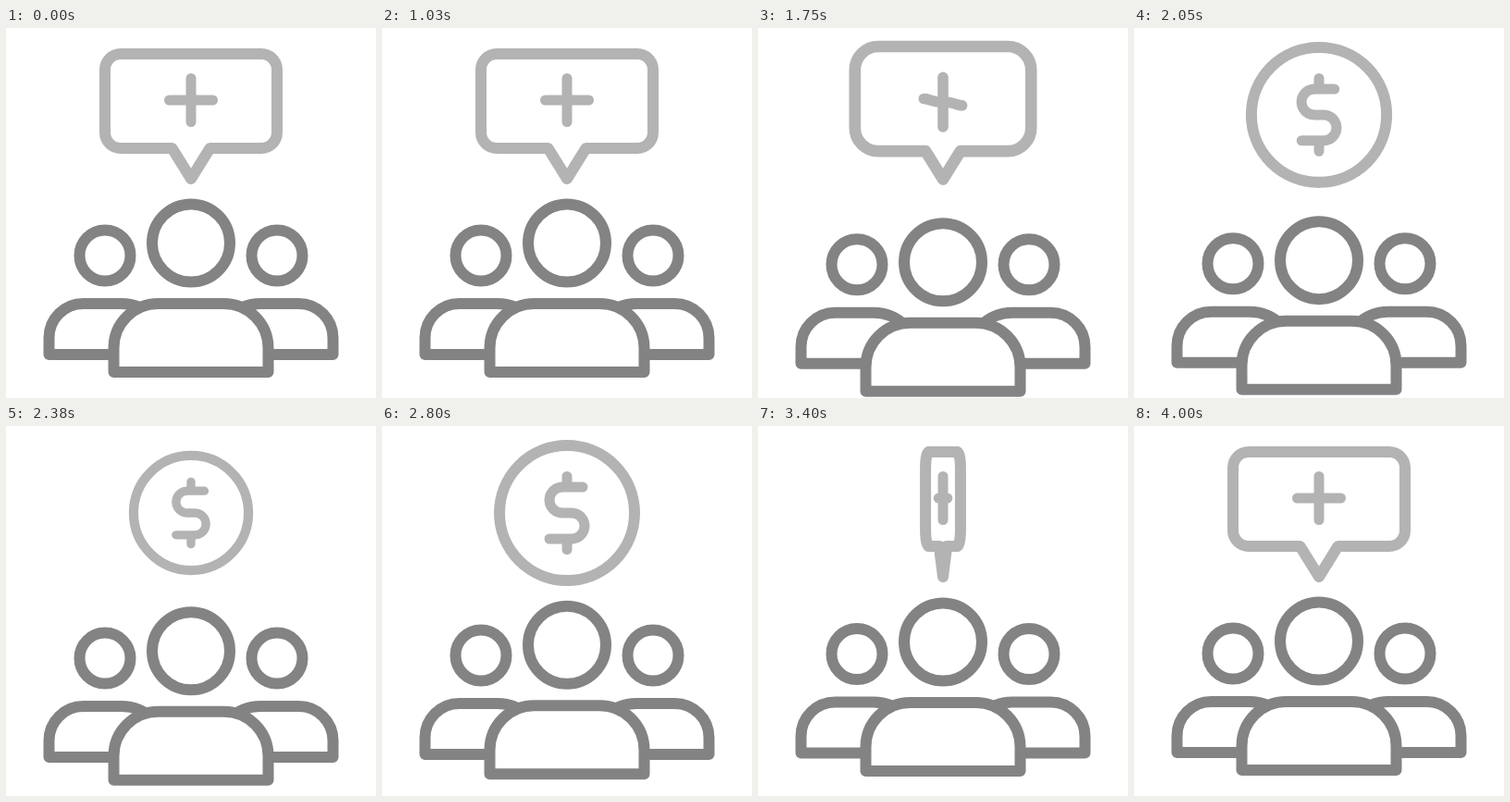
An HTML page with a canvas for the animation above (4030 ms loop, 400 by 400 pixels).

```html
<!DOCTYPE html>
<html>
<head>
<meta charset="utf-8">
<style>
html, body { margin: 0; width: 100%; height: 100%; overflow: hidden; background: #fff; }
canvas { display: block; }
</style>
</head>
<body>
<canvas id="stage" width="400" height="400"></canvas>
<script>
const ctx = document.getElementById('stage').getContext('2d');
const LOOP = 4030, DARK = '#838383', LIGHT = '#b3b3b3';
const mix = (a, b, k) => a + (b - a) * k;

// Smooth track through [time, value] points that never overshoots them.
function track(keys) {
  const last = keys.length - 1;
  const slope = i => (keys[i + 1][1] - keys[i][1]) / (keys[i + 1][0] - keys[i][0]);
  const tangents = keys.map((_, i) => {
    if (i === 0 || i === last) return 0;
    const a = slope(i - 1), b = slope(i);
    return a * b > 0 ? 2 * a * b / (a + b) : 0;
  });
  return t => {
    if (t <= keys[0][0]) return keys[0][1];
    if (t >= keys[last][0]) return keys[last][1];
    const i = keys.findIndex(key => key[0] > t) - 1;
    const [t0, v0] = keys[i], [t1, v1] = keys[i + 1];
    const d = t1 - t0, x = (t - t0) / d, y = 1 - x;
    return v0 * (1 + 2 * x) * y * y + v1 * (3 - 2 * x) * x * x
      + d * x * y * (tangents[i] * y - tangents[i + 1] * x);
  };
}

const drop = track([[1030, 0], [1270, 11.5], [1540, 20], [1700, 21], [1760, 20.7], [2110, 18],
  [2380, 10.8], [2650, 6], [2800, 4.2], [3190, 2], [3400, 1], [4000, 0]]);
const bubbleScale = track([[1030, 1], [1290, 0.866], [1540, 1.074], [1750, 1.06], [2080, 1]]);
const tilt = track([[1030, 0], [1280, -20], [1540, 0]]);
const morph = track([[1590, 0], [1750, 0.13], [1900, 0.7], [2070, 1]]);
const coinScale = track([[2080, 1], [2380, 0.85], [2680, 1.01], [2800, 1], [3000, 1], [3340, 0.93]]);
const flip = track([[3000, 1], [3170, 0.6], [3340, 0], [3400, -0.2], [3520, -0.6], [3700, -0.93], [4000, -1]]);

// The dollar's S around its centre, from top right to bottom left.
const curve = [[17, -28]];
for (let i = 0; i <= 12; i++) {
  const a = Math.PI * i / 12;
  curve.push([-5 - 14 * Math.sin(a), -14 - 14 * Math.cos(a)]);
}
for (let i = 0; i <= 12; i++) {
  const a = Math.PI * i / 12;
  curve.push([5 + 14 * Math.sin(a), 14 - 14 * Math.cos(a)]);
}
curve.push([-19, 28]);

function paint(color, width, fill) {
  if (fill) { ctx.fillStyle = '#fff'; ctx.fill(); }
  ctx.strokeStyle = color;
  ctx.lineWidth = width;
  ctx.stroke();
}

function head(x, y, r) {
  ctx.beginPath();
  ctx.arc(x, y, r, 0, 2 * Math.PI);
  paint(DARK, 12);
}

function body(left, right, top, bottom, rLeft, rRight) {
  ctx.beginPath();
  ctx.moveTo(left, bottom);
  ctx.arcTo(left, top, right, top, rLeft);
  ctx.arcTo(right, top, right, bottom, rRight);
  ctx.lineTo(right, bottom);
  ctx.closePath();
  paint(DARK, 12, true);
}

function people(y) {
  const side = y * 0.47;
  head(107, 246 + side, 27.5);
  head(293, 246 + side, 27.5);
  body(46.5, 173, 298 + side, 353 + side, 37, 48);
  body(227, 353.5, 298 + side, 353 + side, 48, 37);
  head(200, 232.5 + y, 42);
  body(116.5, 283.5, 298 + y, 372 + y, 48, 48);
}

// Shapes are scaled, but the pen keeps its width through the flip.
function scaled(cy, sx, sy, draw) {
  ctx.save();
  ctx.translate(200, cy);
  ctx.scale(sx, sy);
  ctx.beginPath();
  draw();
  ctx.restore();
}

function frame(k, s) {
  const half = mix(93 * s, 73, k), r = mix(17 * s, 73, k), w = mix(20.5 * s, 0, k);
  const top = mix(-135 * s, -142, k), bottom = mix(-33 * s, 4, k), tip = mix(0, 4, k);
  const mid = (top + bottom) / 2;
  ctx.moveTo(0, tip);
  ctx.lineTo(w, bottom);
  ctx.arcTo(half, bottom, half, mid, r);
  ctx.arcTo(half, top, 0, top, r);
  ctx.arcTo(-half, top, -half, mid, r);
  ctx.arcTo(-half, bottom, -w, bottom, r);
  ctx.lineTo(-w, bottom);
  ctx.closePath();
}

function symbol(k, s, angle) {
  ctx.rotate(angle * Math.PI / 180);
  curve.forEach(([x, y], i) => {
    const bar = mix(-23.5, 23.5, i / (curve.length - 1)) * s;
    ctx.lineTo(mix(bar, x, k), y * k);
  });
  const end = mix(23.5 * s, 39.5, k), gap = 28 * k;
  for (const sign of [-1, 1]) {
    ctx.moveTo(0, sign * end);
    ctx.lineTo(0, sign * gap);
  }
}

function sign(t) {
  const turn = flip(t), sx = Math.max(Math.abs(turn), 0.01);
  const back = turn < 0;
  const k = back ? 0 : morph(t);
  const s = back ? 1 : bubbleScale(t);
  const sy = back ? 1 : coinScale(t);
  const zoom = t < 3000 ? sy : 1;
  const pen = mix(s, 1, k) * zoom;
  const wide = sx * zoom;

  // The coin is scaled about its own centre, the bubble about its tip.
  scaled(94, wide, sy, () => { ctx.translate(0, 69); frame(k, s); });
  paint(LIGHT, 12 * pen);
  const cy = mix(163 - 85 * Math.min(s, 1), 94, k);
  scaled(cy, wide, sy, () => symbol(k, s, tilt(t)));
  paint(LIGHT, 11 * pen);
}

function render(now) {
  const t = now % LOOP;
  ctx.clearRect(0, 0, 400, 400);
  ctx.lineCap = ctx.lineJoin = 'round';
  people(drop(t));
  sign(t);
}

const start = performance.now();
function loop() {
  render(performance.now() - start);
  requestAnimationFrame(loop);
}
loop();
</script>
</body>
</html>
```
